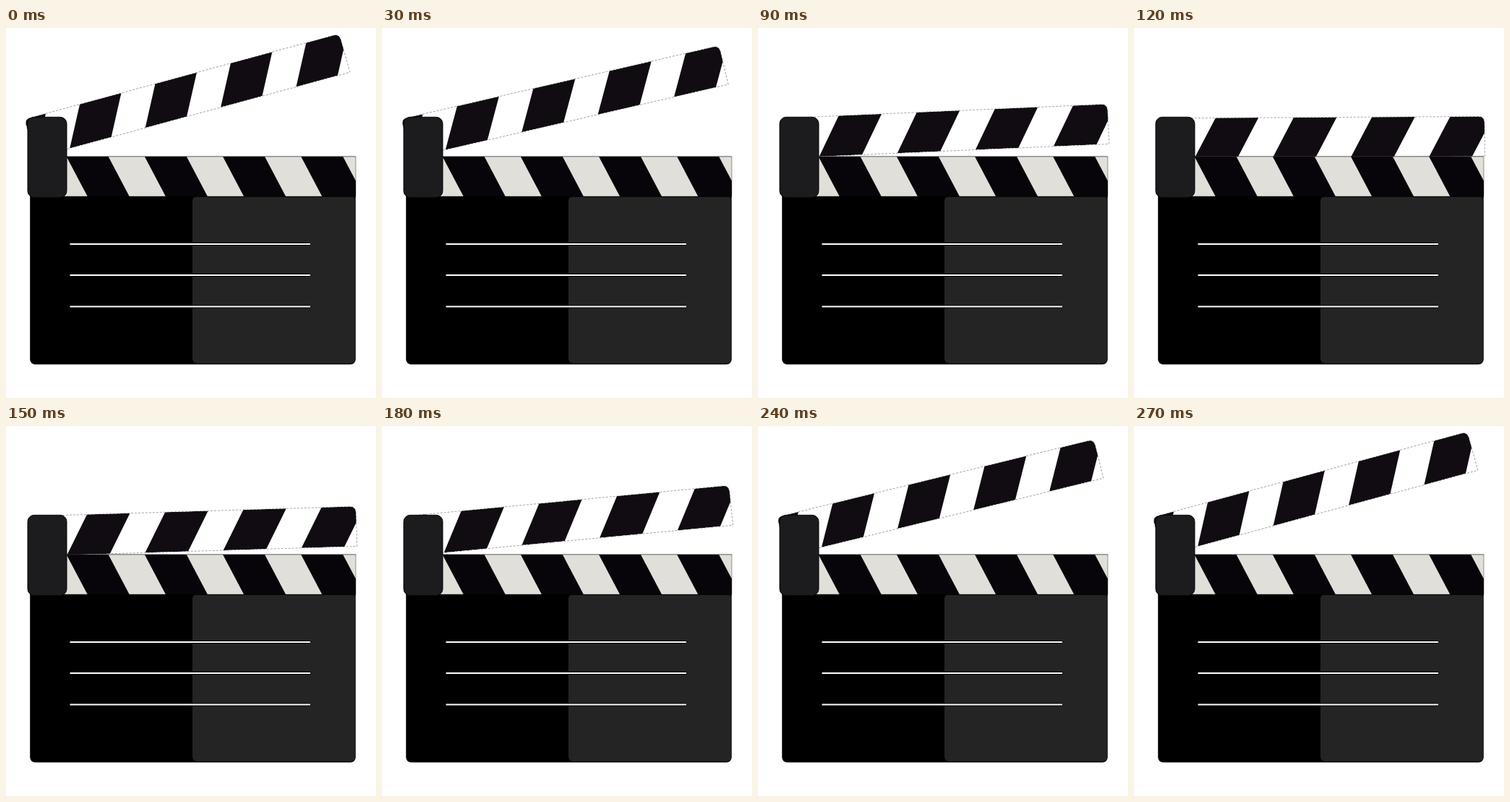
An HTML page for the animation above (0.48 s loop, 512 by 512 pixels).

```html
<!DOCTYPE html>
<html lang="en">
<head>
<meta charset="utf-8">
<title>Clapperboard</title>
<style>
  html, body { margin: 0; height: 100%; overflow: hidden; background: #fff; }
  svg { display: block; width: 100vw; height: 100vh; }
</style>
</head>
<body>
<svg viewBox="0 0 512 512">
  <defs>
    <path id="armOutline" d="M34 133q0-8.2 8-8.2H477q7.3 0 8 8L485.4 180H34z"/>
    <clipPath id="armShape"><use href="#armOutline"/></clipPath>
    <clipPath id="barShape"><rect x="60" y="178" width="424" height="56"/></clipPath>
    <path id="lines" d="M88.5 299H421M88.5 342H421M88.5 385.5H421"/>
  </defs>

  <g id="arm">
    <use href="#armOutline" fill="#fff" stroke="#000" stroke-width=".35" stroke-dasharray="3 2"/>
    <path id="armStripes" clip-path="url(#armShape)" fill="#110c12"/>
  </g>

  <rect x="33.2" y="226" width="450.6" height="239.5" rx="7"/>
  <rect x="258" y="233" width="225.3" height="231" rx="6" fill="#242424"/>

  <g clip-path="url(#barShape)">
    <rect x="60" y="178" width="424" height="55" fill="#e0dfda"/>
    <path id="barStripes" fill="#070509"/>
    <path d="M60 233.3H484" stroke="#000"/>
  </g>
  <path d="M84 177.8H484" stroke="#333" stroke-width=".8"/>
  <path d="M484 178V233" stroke="#000" stroke-width=".4"/>

  <rect x="30" y="123.3" width="54" height="111.2" rx="9" fill="#1c1b1e" stroke="#050505"/>

  <use href="#lines" stroke="#000" stroke-width="4"/>
  <use href="#lines" stroke="#fff" stroke-width="1.8"/>
</svg>
<script>
const LOOP = 480, STEP = 30, CLOSED_AT = 120, OPEN_AT = 270;
const OPEN = 15.2, CLOSED = 0.3, PIVOT = '35.6 156.2';
const PITCH = 108.2;
const byId = id => document.getElementById(id);

// Slanted bands repeated every PITCH pixels.
function stripes(first, count, x, y, width, height, slant) {
  let d = '';
  for (let i = first; i < first + count; i++) {
    d += `M${x + i * PITCH} ${y}h${width}l${slant} ${height}h${-width}z`;
  }
  return d;
}

byId('armStripes').setAttribute('d', stripes(-1, 5, 113, 124.8, 59.5, 55.2, -29.3));
byId('barStripes').setAttribute('d', stripes(0, 4, 83.7, 178, 58, 55, 29));

const ease = p => (1 - Math.cos(Math.PI * p)) / 2;

function angleAt(t) {
  const openness = t < CLOSED_AT
    ? 1 - ease(t / CLOSED_AT)
    : ease(Math.min(1, (t - CLOSED_AT) / (OPEN_AT - CLOSED_AT)));
  return CLOSED + (OPEN - CLOSED) * openness;
}

function draw() {
  const t = Math.floor(performance.now() % LOOP / STEP) * STEP;
  byId('arm').setAttribute('transform', `rotate(${-angleAt(t)} ${PIVOT})`);
  requestAnimationFrame(draw);
}
draw();
</script>
</body>
</html>
```
